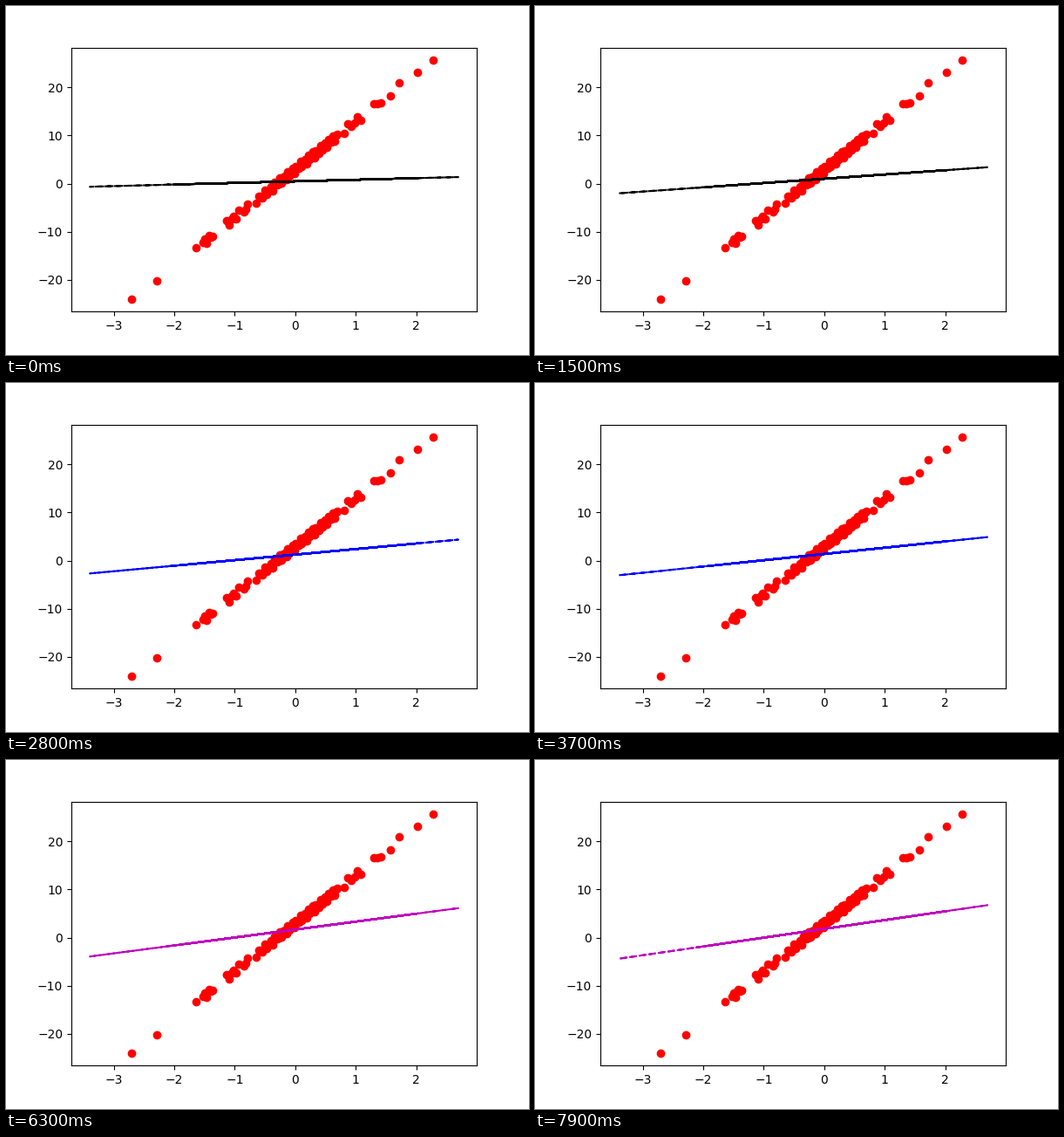
Animation of 600x400 px, one loop 8000 ms. Source, as a matplotlib script:

```python
import numpy as np
import matplotlib.pyplot as plt
from matplotlib.animation import FuncAnimation

FRAMES = 80
INTERVAL = 100
COLORS = "kbcm"
RATE = 0.1

# Clusters of inputs as (first, last, count); the outliers stand alone.
CLUSTERS = [(-1.53, -1.36, 6), (-1.14, -0.93, 6), (-0.85, -0.79, 3),
            (-0.64, -0.27, 12), (-0.25, 0.70, 38), (0.815, 1.086, 6),
            (1.30, 1.42, 3)]
OUTLIERS = [(-2.71, -24.0), (-2.29, -20.2), (-1.64, -13.3), (1.575, 18.3),
            (1.716, 20.9), (2.02, 23.1), (2.28, 25.67)]


def scatter():
    """Points around y = 10x + 3 with a regular wobble."""
    xs = np.concatenate([np.linspace(*c) for c in CLUSTERS])
    wobble = 0.75 * np.sin(2.4 * np.arange(len(xs)))
    return xs, 10 * xs + 3 + wobble


def adagrad(start, goal):
    """Parameter value per step, pulled towards goal with a shrinking rate."""
    values = [start]
    total = (goal - start + RATE) ** 2
    for _ in range(FRAMES - 1):
        grad = goal - values[-1]
        total += grad ** 2
        values.append(values[-1] + RATE * grad / np.sqrt(total))
    return values


slopes = adagrad(0.33, 10)
offsets = adagrad(0.47, 3.27)

# Unsorted inputs: the dashed line runs back and forth over itself.
rng = np.random.default_rng(4)
line_x = np.clip(rng.normal(size=100), -2.25, 2.03)
line_x[37], line_x[62] = -3.396, 2.695

fig, ax = plt.subplots(figsize=(6, 4), dpi=100)
fig.subplots_adjust(left=0.125, right=0.9, bottom=0.125, top=0.88)
ax.set(xlim=(-3.701, 2.9993), ylim=(-26.53, 28.18),
       xticks=range(-3, 3), yticks=range(-20, 21, 10))

ax.plot(*scatter(), "ro")
ax.plot(*zip(*OUTLIERS), "ro")
line, = ax.plot([], [], "--", lw=1.5)


def update(i):
    line.set_data(line_x, slopes[i] * line_x + offsets[i])
    line.set_color(COLORS[i // 20])
    return line,


anim = FuncAnimation(fig, update, frames=FRAMES, interval=INTERVAL,
                     init_func=lambda: update(0), repeat=True, repeat_delay=0)
plt.show()
```
